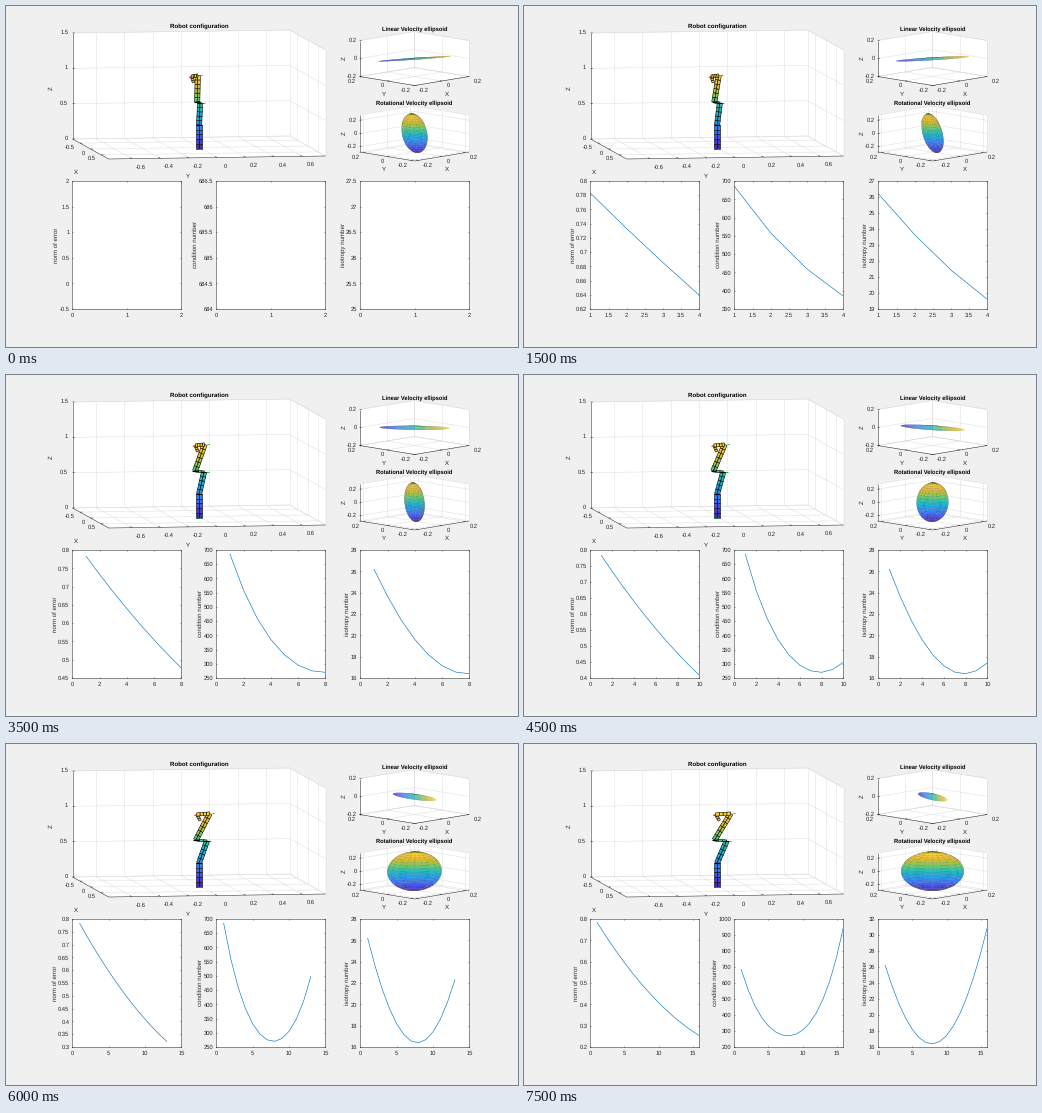
A matplotlib script that plays this animation: 512 px wide and 341 px high, repeating every 8 s.

```python
import numpy as np
import matplotlib.pyplot as plt
from matplotlib.animation import FuncAnimation
from matplotlib.collections import LineCollection, PolyCollection
from matplotlib.colors import LinearSegmentedColormap

W, H, DPI = 512, 341, 64
PX = 72 / DPI  # points per pixel
STEPS, STEP_MS = 16, 500
INK, GRID, BLUE = "#262626", "#dedede", "#0072bd"
SMALL, LARGE = 5.8 * PX, 6.17 * PX

plt.rcParams.update({"font.family": "Liberation Sans", "axes.unicode_minus": False,
                     "text.hinting": "none"})
parula = LinearSegmentedColormap.from_list("parula", [
    "#3e26a8", "#4743e8", "#3c72fe", "#2796eb", "#12b1d6",
    "#32c69f", "#80cb58", "#d6bb29", "#fec735", "#f9fb15"])

fig = plt.figure(figsize=(W / DPI, H / DPI), dpi=DPI, facecolor="#f0f0f0")
stage = fig.add_axes([0, 0, 1, 1])
stage.set(xlim=(0.4, W + 0.4), ylim=(H, 0))
stage.axis("off")


def label(x, y, s, size=SMALL, ha="center", color=INK, **kw):
    stage.text(x, y, s, fontsize=size, ha=ha, va="center", color=color, **kw)


def segments(lines, color, width, z):
    stage.add_collection(LineCollection(lines, colors=color, linewidths=width * PX, zorder=z))


def tick_text(points, values, dx, dy, ha):
    for (x, y), v in zip(points, values):
        label(x + dx, y + dy, f"{round(v, 1):g}", ha=ha)


# ---- 3D boxes ----

def box3d(left, front, right, height, fa, fb, fz):
    """Draw a 3D axes box; return tick positions on its three labelled edges."""
    left, front, right = map(np.array, (left, front, right))
    back, up = left + right - front, np.array([0, -height])
    a, b = front - left, right - front
    stage.add_patch(plt.Polygon(
        [left, front, right, right + up, back + up, left + up], color="white", lw=0, zorder=1))
    grid = [(back, back + up), (right, right + up), (left + up, back + up),
            (back + up, right + up), (left, back), (back, right)]
    for f in fa:
        grid += [(left + f * a, back + f * a), (back + f * a, back + f * a + up)]
    for f in fb:
        grid += [(left + f * b, front + f * b), (left + f * b, left + f * b + up)]
    for f in fz:
        grid += [(left + f * up, back + f * up), (back + f * up, right + f * up)]
    segments(grid, GRID, 0.5, 2)

    pa = [left + f * a for f in fa]
    pb = [front + f * b for f in fb]
    pz = [left + f * up for f in fz]
    ta, tb = a / np.hypot(*a) * 2.2, b / np.hypot(*b) * 2.2
    edges = [(left, front), (front, right), (left, left + up)]
    edges += [(p, p + tb) for p in pa + pz] + [(p, p - ta) for p in pb]
    segments(edges, INK, 0.5, 3)
    return pa, pb, pz


def main_box():
    xs, ys, zs = np.arange(-1, 2) * 0.5, np.arange(-3, 4) * 0.2, np.arange(4) * 0.5
    pa, pb, pz = box3d((67, 133), (103, 153), (320, 150), 106,
                       0.5 + xs / 1.7, 0.5 + ys / 1.53, zs / 1.5)
    tick_text(pa, xs, -5.5, 4, "right")
    tick_text(pb, ys, 8.5, 8.5, "center")
    tick_text(pz, zs, -4.5, -0.5, "right")
    label(70.5, 166.5, "X", LARGE)
    label(182.5, 170, "Y", LARGE)
    label(45.5, 82, "Z", LARGE, rotation=90)
    label(193.7, 20.5, "Robot configuration", LARGE, weight="bold", color="black")


def small_box(base, height, span, tall, title):
    """Box with ticks at -0.2, 0 and 0.2; span and tall are its full ranges."""
    v = np.arange(-1, 2) * 0.2
    pa, pb, pz = box3d((354, base), (409, base + 9), (463.5, base), height,
                       0.5 - v / span, 0.5 + v / span, 0.5 + v / tall)
    tick_text(pa, v, -3.5, 4.8, "right")
    tick_text(pb, v, 4.5, 4.8, "left")
    tick_text(pz, v, -3, 0, "right")
    label(378, base + 17.5, "Y", LARGE)
    label(441.5, base + 17.5, "X", LARGE)
    label(338.5, base - height / 2, "Z", LARGE, rotation=90)
    label(409, base - height - 11.5, title, SMALL, weight="bold", color="black")


main_box()
small_box(70.5, 36, 0.4, 0.4, "Linear Velocity ellipsoid")
small_box(146, 37, 0.465, 0.56, "Rotational Velocity ellipsoid")


# ---- robot and ellipsoids ----

def track(k, *values):
    """Value at step k, moving through evenly spaced key values."""
    return np.interp(k, np.linspace(0, STEPS - 1, len(values)), values)


def link(p, q, width, rows, cols):
    """Faces of a bar from p to q, split into a mesh."""
    p, q = np.array(p), np.array(q)
    d = q - p
    side = np.array([-d[1], d[0]]) / np.hypot(*d) * width
    at = lambda i, j: p + d * i / rows + side * (j / cols - 0.5)
    return [[at(i, j), at(i + 1, j), at(i + 1, j + 1), at(i, j + 1)]
            for i in range(rows) for j in range(cols)]


def robot(k):
    base, shoulder = (193.5, 142.5), (193.5, 119)
    elbow = (track(k, 194.5, 203), 97)
    fold = (track(k, 191.6, 189.4, 191), 96)
    top = (track(k, 192.2, 199.5, 207), 69.5)
    wrist = (track(k, 186, 190, 192), 70.5)
    tip = (track(k, 188, 192.5, 195.8), 76.5)
    faces = (link(wrist, tip, 2.6, 3, 1) + link(base, shoulder, 5.5, 5, 2)
             + link(shoulder, elbow, 5.2, 5, 2) + link(fold, top, 5.2, 6, 2)
             + link(elbow, fold, 2, 3, 1) + link(top, wrist, 3.2, 4, 1))
    joints = [[(x - 2.8, y), (x + 2.8, y)] for x, y in (shoulder, elbow, fold)]
    axes = [[(x + 2, y - 0.5), (x + 4.5, y - 0.5)] for x, y in (elbow, top)]
    axes += [[(192.7, 142.8), (195.2, 142.8)], [wrist, (wrist[0] - 2.5, wrist[1] + 1)]]
    return faces, joints, axes


def unit_sphere(n=20, tilt=0.17):
    """Visible faces of a sphere seen slightly from above, as (x, y) corners."""
    lat = np.linspace(-np.pi / 2, np.pi / 2, n + 1)[:, None]
    lon = np.linspace(-np.pi, np.pi, n + 1)[None, :]
    x, y, z = np.cos(lat) * np.sin(lon), np.sin(lat) + 0 * lon, np.cos(lat) * np.cos(lon)
    y, z = y * np.cos(tilt) - z * np.sin(tilt), y * np.sin(tilt) + z * np.cos(tilt)
    p = np.stack([x, y, z], -1)
    quads = np.stack([p[:-1, :-1], p[1:, :-1], p[1:, 1:], p[:-1, 1:]], 2).reshape(-1, 4, 3)
    return quads[quads[..., 2].mean(1) > -0.05][..., :2]


SPHERE = unit_sphere()


def linear_shape(k):
    width = track(k, 36.3, 36.5, 36.6, 32, 21.7, 14.6)
    slope = -0.25 - 2.75 * np.tanh((k - 6.8) / 2.6)
    return [[width, 0], [slope, 0.8 + 0.165 * k]]


def rotational_shape(k):
    width = track(k, 12.7, 10.1, 7, 16, 27.3, 31.5)
    lean = track(k, -2.9, -4.4, -2.9, 0.5, 0.8, 0)
    return [[width, lean], [0, 19.6]]


def mesh(width, z, edge):
    c = PolyCollection([], edgecolors=edge, linewidths=width * PX, zorder=z)
    stage.add_collection(c)
    return c


def strokes(colors, width, z):
    c = LineCollection([], colors=colors, linewidths=width * PX, zorder=z)
    stage.add_collection(c)
    return c


arm = mesh(0.55, 6, "black")
joint_lines = strokes("black", 1.1, 7)
axis_lines = strokes(["#00c020"] * 3 + ["#e02020"], 0.9, 8)
# mesh, shape over time, centre, colour direction
blobs = [(mesh(0.2, 6, (0, 0, 0, 0.08)), linear_shape, (409, 52.8), (1, 0.1)),
         (mesh(0.25, 6, (0, 0, 0, 0.3)), rotational_shape, (408.9, 127.2), (0, 1))]


def draw_blob(k, faces, shape, center, tint):
    offset = SPHERE @ np.array(shape(k)).T
    faces.set_verts(center + offset * (1, -1))
    faces.set_facecolor(parula(0.5 + 0.5 * (SPHERE @ tint).mean(1)))


# ---- charts ----

def through(keys):
    """Smooth curve through a few (x, y) points, sampled at 1..STEPS."""
    x, y = np.transpose(keys)
    return np.polyval(np.polyfit(x - 8, y, len(x) - 1), np.arange(1, STEPS + 1) - 8)


error = through([(1, 0.783), (8, 0.477), (16, 0.253)])
condition = through([(1, 685.2), (4, 385), (8, 270), (13, 498), (16, 950)])
isotropy = through([(1, 26.2), (4, 19.6), (8, 16.4), (13, 22.3), (16, 31)])


def chart(x, name, data, first_low):
    ax = fig.add_axes([x / W, 1 - 303 / H, 109 / W, 128 / H])
    for s in ax.spines.values():
        s.set(color=INK, linewidth=0.5 * PX)
    ax.tick_params(direction="in", length=1.3 * PX, width=0.5 * PX, color=INK,
                   labelcolor=INK, labelsize=SMALL, top=True, right=True)
    ax.tick_params(axis="x", pad=4 * PX)
    ax.tick_params(axis="y", pad=3 * PX)
    ax.set_ylabel(name, fontsize=LARGE, color=INK, labelpad=0.5 * PX)
    line, = ax.plot([], [], color=BLUE, lw=0.6 * PX)
    return ax, line, data, first_low


charts = [chart(66.4, "norm of error", error, -0.5),
          chart(210.4, "condition number", condition, 684),
          chart(354.4, "isotropy number", isotropy, 25)]


def nice_ticks(lo, hi, most):
    """Smallest 1-2-5 step that covers lo..hi in at most `most` intervals."""
    for e in range(-4, 4):
        for m in (1, 2, 5):
            step = m * 10.0 ** e
            a, b = np.floor(lo / step + 1e-6), np.ceil(hi / step - 1e-6)
            if b - a <= most:
                return np.arange(a, b + 1) * step


def set_axis(axis, ticks, limit, top):
    limit(ticks[0], top)
    ticks = [t for t in ticks if t <= top]
    axis.set_ticks(ticks, [f"{round(t, 4):g}" for t in ticks])


def draw_chart(k, ax, line, data, first_low):
    n = k + 1
    xs, ys = np.arange(1, n + 1), data[:n]
    line.set_data(xs, ys)
    if n == 1:
        xt, yt = np.arange(3), first_low + np.arange(6) * 0.5
    else:
        xt, yt = nice_ticks(1, n, 6), nice_ticks(ys.min(), ys.max(), 10)
    set_axis(ax.xaxis, xt, ax.set_xlim, min(xt[-1], STEPS))
    set_axis(ax.yaxis, yt, ax.set_ylim, yt[-1])


def update(k):
    faces, joints, axes = robot(k)
    arm.set_verts(faces)
    arm.set_facecolor(parula((142 - np.mean(faces, axis=1)[:, 1]) / 78))
    joint_lines.set_segments(joints)
    axis_lines.set_segments(axes)
    for b in blobs:
        draw_blob(k, *b)
    for c in charts:
        draw_chart(k, *c)
    return []


anim = FuncAnimation(fig, update, frames=STEPS, interval=STEP_MS,
                     repeat=True, repeat_delay=0, cache_frame_data=False)
plt.show()
```
